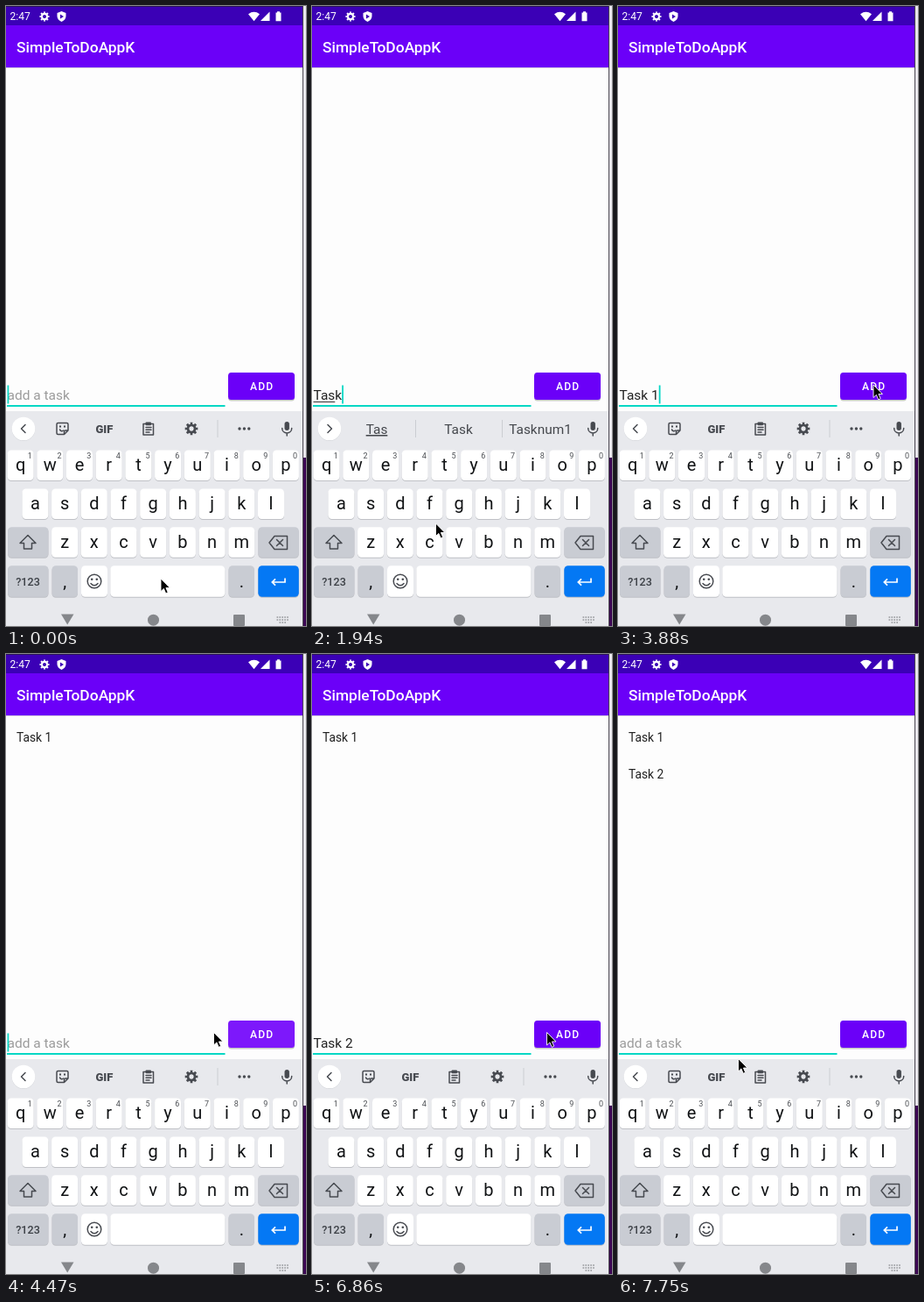
An HTML page for the animation above (8 s loop, 343 by 707 pixels).

```html
<!DOCTYPE html>
<html lang="en">
<head>
<meta charset="utf-8">
<title>To-do app</title>
<style>
  html, body { margin: 0; width: 100%; height: 100%; overflow: hidden; background: #fdfdfd; }
  svg { display: block; width: 100%; height: 100%; }
  text { font-family: Roboto, Arial, sans-serif; white-space: pre; }
  .mid { text-anchor: middle; }
  .title { font-size: 17.4px; font-weight: 500; fill: #fff; }
  .clock { font-size: 12.1px; fill: #fff; }
  .item { font-size: 13.8px; fill: #212121; }
  .field { font-size: 15.5px; fill: #212121; }
  .hint { font-size: 15.5px; fill: #9b9b9b; }
  .add { font-size: 12.1px; font-weight: 500; letter-spacing: 1.2px; fill: #fff; }
  .word { font-size: 15.4px; fill: #44474c; }
  .letter { font-size: 20px; fill: #111315; }
  .digit { font-size: 9px; fill: #4c4f54; }
  .mode { font-size: 12.6px; font-weight: 500; fill: #3c4046; }
  .gif { font-size: 13px; font-weight: 900; fill: #474a50; }
  .line { fill: none; stroke: #474a50; stroke-width: 1.5; stroke-linejoin: round; stroke-linecap: round; }
  .solid { fill: #474a50; }
  .nav { fill: #85878b; }
</style>
</head>
<body>
<svg viewBox="0 0 343 707" preserveAspectRatio="none">
  <defs>
    <g id="gear">
      <circle r="4" fill="none" stroke="currentColor" stroke-width="2.8"/>
      <circle r="6.1" fill="none" stroke="currentColor" stroke-width="2.2" pathLength="16" stroke-dasharray="1.1 .9" stroke-dashoffset=".55"/>
    </g>
  </defs>

  <rect width="343" height="707" fill="#fdfdfd"/>
  <rect y="70" width="339" height="1" fill="#d6d0df"/>
  <rect y="22" width="339" height="48" fill="#6b00f8"/>
  <rect width="339" height="22" fill="#3b00b6"/>
  <rect width="339" height="1" fill="#2a1558"/>

  <text class="clock" x="4.5" y="16.2">2:47</text>
  <use href="#gear" transform="translate(44 12) scale(.77)" color="#fff"/>
  <path d="M63.5 6l5 2v3.600c0 3-2 5.200-5 6.400c-3-1.200-5-3.400-5-6.400V8z" fill="#fff"/>
  <path d="M62 9.400v5l4-2.500z" fill="#3b00b6"/>
  <path d="M283.500 17.200L277 9.200Q283.500 4.400 290 9.200z" fill="#fff"/>
  <path d="M291 17h10.500V6.500z" fill="#fff"/>
  <path d="M308.500 7.500h1.500v-1.200h3v1.200h1.500v9.700h-6z" fill="#fff"/>
  <text class="title" x="12" y="53">SimpleToDoAppK</text>

  <text class="item" x="12" y="100" id="item1">Task 1</text>
  <text class="item" x="12" y="142" id="item2">Task 2</text>

  <rect x="1" y="455" width="249.500" height="2" fill="#08d7c5"/>
  <text class="hint" x="1.500" y="449" id="hint">add a task</text>
  <text class="field" x="1.500" y="449" id="field"></text>
  <rect x="1.500" y="451" height="1" fill="#333" id="composing"/>
  <rect y="432.500" width="1.800" height="21" fill="#08d7c5" id="caret"/>

  <rect x="254" y="419" width="76" height="31.500" rx="3.500" fill="#000" opacity=".22"/>
  <rect x="254" y="418" width="76" height="31" rx="3.500" id="button"/>
  <text class="add" x="279" y="438.200">ADD</text>

  <rect y="462" width="339" height="245" fill="#e8e9ed"/>
  <circle cx="20" cy="482.600" r="13.300" fill="#cfd1d6"/>
  <circle cx="20" cy="482" r="13.300" fill="#fff"/>
  <path class="line" id="chevron" stroke-width="1.8"/>

  <g id="tools">
    <path class="line" d="M59.500 475.500h10q1.500 0 1.500 1.500v7l-4.500 4.500h-7q-1.500 0-1.500-1.500v-10q0-1.500 1.500-1.500zM71 484h-3q-1.500 0-1.500 1.500v3M61.500 483q2 3 4 1"/>
    <path class="solid" d="M61 478.500h2v2h-2zM66 478.500h2v2h-2z"/>
    <text class="gif" x="102.500" y="486.500">GIF</text>
    <path class="line" d="M157 476.500h11.500v12.500H157zM160 480.500h6M160 483.200h6M160 486h4"/>
    <rect class="solid" x="159.500" y="474.500" width="6.500" height="3.800" rx="1"/>
    <use href="#gear" transform="translate(212 482) scale(1.020)" color="#474a50"/>
    <path d="M242 472v20" stroke="#cbcdd2"/>
    <g class="solid"><circle cx="267" cy="482" r="1.700"/><circle cx="272.400" cy="482" r="1.700"/><circle cx="277.800" cy="482" r="1.700"/></g>
  </g>
  <g id="words">
    <path d="M118.500 472v20M217.500 472v20" stroke="#cbcdd2"/>
    <text class="word mid" x="74" y="488"></text>
    <text class="word mid" x="167.500" y="488"></text>
    <text class="word mid" x="261" y="488"></text>
  </g>
  <rect class="solid" x="318.500" y="474" width="5.400" height="10" rx="2.700"/>
  <path class="line" d="M315.700 481.500c0 7.200 11 7.200 11 0M321.200 487v3"/>

  <g id="keys"></g>

  <path class="line" d="M25 603.500l9 9h-4.500v6.500h-9v-6.500H16z"/>
  <path class="line" d="M307 604.500h14.500v15H307l-6-7.500zM309.500 608.500l7 7M316.500 608.500l-7 7"/>
  <circle class="line" cx="101" cy="656" r="7.800"/>
  <path class="line" d="M97 658.500q4 4.500 8 0"/>
  <circle class="solid" cx="98.200" cy="653.800" r="1.300"/><circle class="solid" cx="103.800" cy="653.800" r="1.300"/>
  <path d="M319 652.500v4.500h-14.500M308 653.300l-3.700 3.700l3.700 3.700" fill="none" stroke="#fff" stroke-width="1.700"/>

  <path class="nav" d="M63 693.500h14.500L70.200 705.500z"/>
  <circle class="nav" cx="168.500" cy="700.200" r="6.500"/>
  <rect class="nav" x="260" y="694" width="13" height="13" rx="1"/>
  <path d="M309.500 697h13.500M309.500 700h13.500M312.500 703h7.500" stroke="#95979b" stroke-width="1.500" stroke-dasharray="1.700 1.200"/>

  <rect x="339" width="4" height="707" fill="#e9e7ec"/>
  <rect x="340" y="515" width="3" height="192" fill="#3c0753"/>
  <rect x="339" width="1" height="707" fill="#4a4650"/>

  <path id="mouse" d="M0 0V14.500L3.400 11.400L5.700 16.800L8.200 15.700L5.900 10.500H10.400Z" fill="#000" stroke="#fff" stroke-width=".9"/>
</svg>
<script>
const $ = id => document.getElementById(id);

// Keyboard
const key = (x, y, w, h, fill = '#fff') =>
  `<rect x="${x}" y="${y + 1}" width="${w}" height="${h}" rx="4.5" fill="#bfc1c6"/>
   <rect x="${x}" y="${y}" width="${w}" height="${h}" rx="4.5" fill="${fill}"/>`;
const label = (x, y, s, cls = 'letter') => `<text class="${cls} mid" x="${x}" y="${y}">${s}</text>`;
const PITCH = 33.7, GRAY = '#c9ccd3';

function row(letters, firstX, y, digits = '') {
  return [...letters].map((c, i) => {
    const x = firstX + i * PITCH;
    return key(x - 15, y, 30, 34.5) + label(x, y + 23.5, c) +
      (digits ? label(x + 10.7, y + 9.3, digits[i], 'digit') : '');
  }).join('');
}

$('keys').innerHTML =
  row('qwertyuiop', 16.6, 506.5, '1234567890') +
  row('asdfghjkl', 33.4, 550.5) +
  row('zxcvbnm', 67.1, 594.3) +
  key(2, 594.3, 46.5, 34.5, GRAY) + key(288.3, 594.3, 46.5, 34.5, GRAY) +
  key(2, 638.3, 46.5, 35.5, GRAY) + label(25, 661, '?123', 'mode') +
  key(52.5, 638.3, 29.5, 35.5, GRAY) + label(67.3, 662.5, ',') +
  key(86, 638.3, 30, 35.5) + key(119.3, 638.3, 131, 35.5) +
  key(254.5, 638.3, 29.5, 35.5, GRAY) + label(269.3, 662.5, '.') +
  key(288.3, 638.3, 46.5, 35.5, '#0478f4');

// Each step changes only the named parts of the state.
const LOOP = 8000;
const T = ['T', 'The', 'This'], TAS = ['Tas', 'Task', 'Tasknum1'],
      TASK = ["Task's", 'Task', 'Tasks'], NEXT = ['is', 'for', 'I'];
const cleared = { text: '', caret: true, pressed: true };
const steps = [
  [0, { text: '', caret: true, composing: 0, words: null, items: 0, pressed: false, mouse: [177, 653] }],
  [140, { mouse: [160, 622] }],
  [290, { mouse: [141.5, 590], caret: false }],
  [740, { caret: true }],
  [1040, { text: 'T', composing: 1, words: T }],
  [1490, { caret: false }],
  [1640, { text: 'Ta', caret: true }],
  [1940, { text: 'Task', composing: 3, words: TAS }],
  [2240, { composing: 4, words: TASK }],
  [2690, { text: 'Task ', composing: 0, words: NEXT }],
  [2840, { text: 'Task 1' }],
  [3130, { words: null }],
  [3280, { mouse: [157, 572] }],
  [3430, { mouse: [228, 497], caret: false }],
  [3580, { mouse: [331, 416] }],
  [3730, { mouse: [320, 428] }],
  [3880, { mouse: [292, 432], caret: true }],
  [4030, { ...cleared, items: 1 }],
  [4180, { mouse: [276, 433] }],
  [4320, { mouse: [250, 432] }],
  [4470, { mouse: [237.5, 431.5] }],
  [4620, { caret: false, pressed: false }],
  [4920, { text: 'T', caret: true, composing: 1, words: T }],
  [5370, { text: 'Ta' }],
  [5670, { text: 'Task', composing: 3, words: TAS }],
  [5970, { composing: 4, words: TASK }],
  [6270, { text: 'Task 2', composing: 0, words: NEXT }],
  [6560, { mouse: [243, 431] }],
  [6710, { mouse: [258, 431], words: null }],
  [6860, { mouse: [268.5, 431.5], caret: false }],
  [7010, { mouse: [273, 432] }],
  [7160, { ...cleared, items: 2 }],
  [7310, { mouse: [222, 443] }],
  [7460, { mouse: [137.5, 461.5] }],
  [7610, { pressed: false }],
  [7750, { caret: false }]
];

const show = (el, on) => el.setAttribute('visibility', on ? 'visible' : 'hidden');
const wordSlots = $('words').querySelectorAll('text');

function render(s) {
  const field = $('field');
  field.textContent = s.text;
  show($('hint'), !s.text);
  show($('caret'), s.caret);
  $('caret').setAttribute('x', 1.5 + (s.text ? field.getComputedTextLength() : 0));
  $('composing').setAttribute('width', s.composing ? field.getSubStringLength(0, s.composing) : 0);
  show($('tools'), !s.words);
  show($('words'), s.words);
  $('chevron').setAttribute('d', s.words ? 'M18 477.500l4.500 4.500l-4.500 4.500' : 'M22 477.500l-4.500 4.500l4.500 4.500');
  wordSlots.forEach((slot, i) => {
    slot.textContent = s.words ? s.words[i] : '';
    slot.setAttribute('text-decoration', s.words === TAS && i === 0 ? 'underline' : 'none');
  });
  show($('item1'), s.items > 0);
  show($('item2'), s.items > 1);
  $('button').setAttribute('fill', s.pressed ? '#7d18fb' : '#6b00f8');
  $('mouse').setAttribute('transform', `translate(${s.mouse})`);
}

let current = -1;
const start = performance.now();
function tick() {
  const t = (performance.now() - start) % LOOP;
  const index = steps.findLastIndex(([at]) => at <= t);
  if (index !== current) {
    current = index;
    render(Object.assign({}, ...steps.slice(0, index + 1).map(([, change]) => change)));
  }
  requestAnimationFrame(tick);
}
tick();
</script>
</body>
</html>
```
